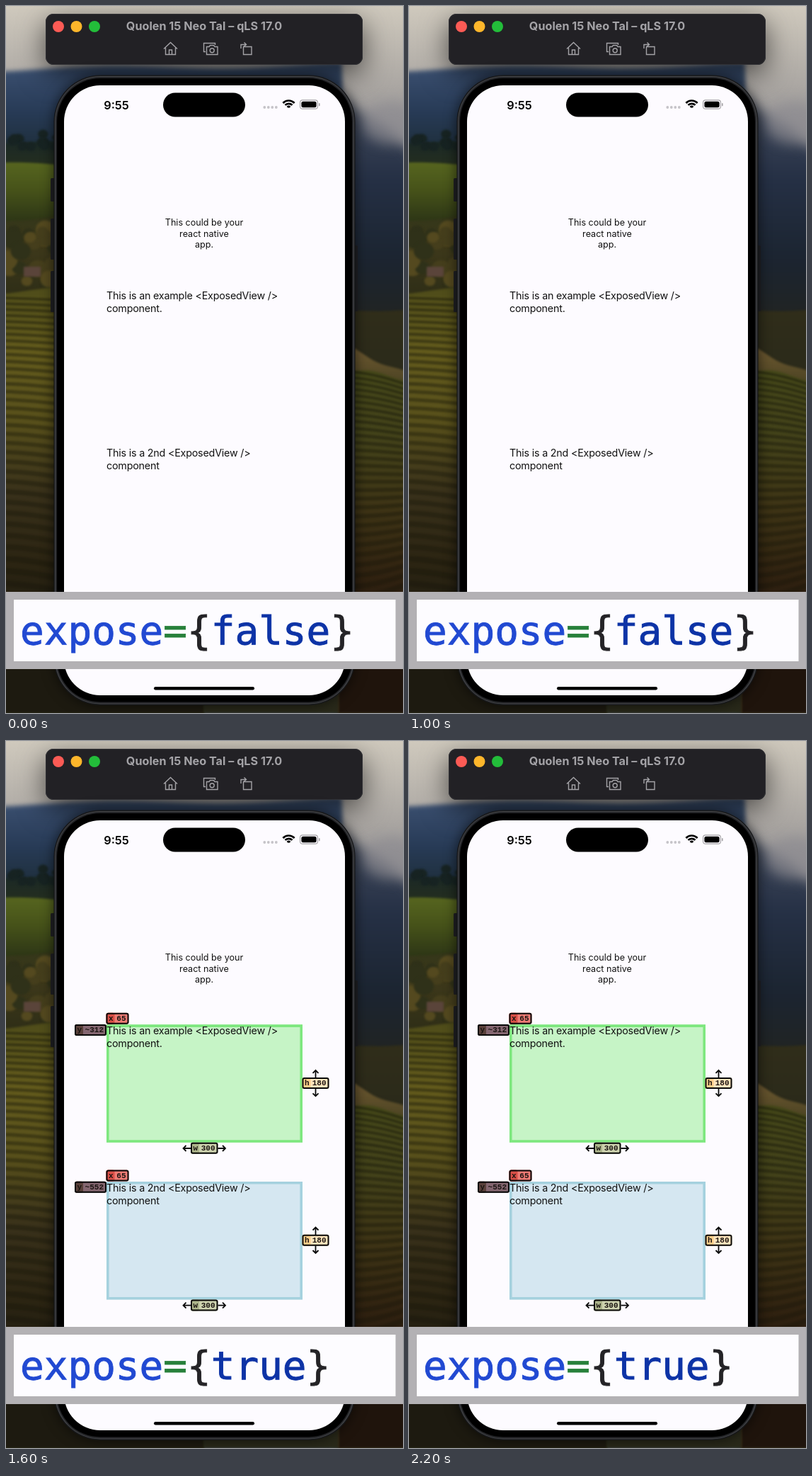
Recreate the animation shown at these times as an HTML page with a canvas. Size 561 by 998 pixels, loop 2.4 s.

```html
<!DOCTYPE html>
<html lang="en">
<head>
<meta charset="utf-8">
<title>Expose demo</title>
<style>
html, body { margin: 0; width: 100%; height: 100%; overflow: hidden; background: #1c1a12; }
canvas { display: block; width: 561px; height: 998px; }
</style>
</head>
<body>
<canvas id="stage" width="561" height="998"></canvas>
<script>
const W = 561, H = 998, MID = 280, LOOP = 2400, SWITCH = LOOP / 2;
const ctx = document.getElementById('stage').getContext('2d');
const SANS = 'Inter, "Liberation Sans", sans-serif';
const MONO = '"Liberation Mono", monospace';
const CODE = '"DejaVu Sans Mono", monospace';
const INK = '#080808', ICON = '#a4a3a7';

function seeded(seed) {
  return () => (seed = seed * 16807 % 2147483647) / 2147483647;
}

function grad(y0, y1, colors) {
  const g = ctx.createLinearGradient(0, y0, 0, y1);
  colors.forEach((c, i) => g.addColorStop(colors.length > 1 ? i / (colors.length - 1) : 0, c));
  return g;
}

function box(x, y, w, h, r, fill) {
  ctx.beginPath();
  ctx.roundRect(x, y, w, h, r);
  ctx.fillStyle = fill;
  ctx.fill();
}

// Stroke lying wholly inside the given box
function frameBox(x, y, w, h, r, color, line) {
  ctx.beginPath();
  ctx.roundRect(x + line / 2, y + line / 2, w - line, h - line, Math.max(0, r - line / 2));
  ctx.strokeStyle = color;
  ctx.lineWidth = line;
  ctx.stroke();
}

function blob(x, y, rx, ry, fill) {
  ctx.beginPath();
  ctx.ellipse(x, y, rx, ry, 0, 0, Math.PI * 2);
  ctx.fillStyle = fill;
  ctx.fill();
}

const dot = (x, y, r, fill) => blob(x, y, r, r, fill);

function path(d, color, line) {
  ctx.strokeStyle = color;
  ctx.lineWidth = line;
  ctx.stroke(new Path2D(d));
}

function text(s, x, y, font, color, align = 'left', track = 0) {
  ctx.font = font;
  ctx.fillStyle = color;
  ctx.textAlign = align;
  ctx.letterSpacing = track + 'px';
  ctx.fillText(s, x, y);
}

// Ground from a ridge line (height y0 to y1) down to the bottom
function ridge(x0, x1, y0, y1, depth, ...colors) {
  ctx.beginPath();
  ctx.moveTo(x0, H);
  for (let u = 0; u <= 1; u += .05)
    ctx.lineTo(x0 + (x1 - x0) * u, y0 + (y1 - y0) * u + 3 * Math.sin(u * 9 + y0));
  ctx.lineTo(x1, H);
  ctx.fillStyle = grad(Math.min(y0, y1), Math.min(y0, y1) + depth, colors);
  ctx.fill();
}

// Vineyard rows, growing wider toward the viewer
function rows(x, top, slope) {
  for (let y = top, step = 8; y < 840; y += step, step *= 1.025) {
    const near = (y - top) / (840 - top), end = y + slope(near);
    path(`M${x} ${y} Q${x + 40} ${y + 1} ${x + 95} ${end}`, `rgba(20,20,8,${.42 - .15 * near})`, step * .45);
  }
}

function scatter(count, seed, y0, y1, size, colors) {
  const rnd = seeded(seed);
  for (let i = 0; i < count; i++) {
    const r = size * (.6 + rnd() * .6);
    blob(rnd() * 75, y0 + (y1 - y0) * rnd(), r, r * .9, colors[i % colors.length]);
  }
}

function landscape() {
  ctx.save();
  ctx.fillStyle = grad(0, 230, ['#cfc9bd', '#aaa6a2', '#85858b']);
  ctx.fillRect(0, 0, W, H);

  ctx.filter = 'blur(3px)';
  ridge(-10, 500, 90, 82, 140, '#3c5172', '#273a55', '#1b2a31');
  ctx.filter = 'blur(9px)';
  ridge(470, 590, 125, 215, 350, '#474f60', '#253045', '#1b2430', '#23231d');
  blob(545, 165, 42, 30, 'rgba(140,138,144,.7)');

  ctx.filter = 'blur(1.5px)';
  ridge(-10, MID, 190, 200, 50, '#1b2826', '#27301c');
  scatter(14, 7, 180, 200, 7, ['#172322']);
  ridge(-10, MID, 224, 220, 80, '#56651f', '#465219', '#2f3816');
  ridge(-10, MID, 302, 280, 120, '#303519', '#3d381a', '#302f17');
  scatter(22, 41, 305, 390, 13, ['#54491f', '#2f3119', '#453e1c']);
  box(25, 368, 24, 14, 1, '#5a443a');
  ridge(-10, MID, 404, 388, 500, '#4c4a19', '#625a1c', '#574f1b', '#38301a', '#2b2412', '#1d1a10');
  ridge(MID, 590, 440, 425, 110, '#302d1a', '#29291a');
  ridge(470, 590, 475, 530, 60, '#715b32', '#4a4222');
  ridge(470, 590, 510, 530, 400, '#444719', '#43421a', '#3d3315', '#2f2110', '#1f140c');

  ctx.filter = 'blur(.8px)';
  rows(-5, 412, near => 4 + 12 * near);
  rows(480, 516, near => 22 - 45 * near);
  ctx.restore();
}

function shadowed(blur, drop, draw) {
  ctx.save();
  ctx.shadowColor = 'rgba(0,0,0,.6)';
  ctx.shadowBlur = blur;
  ctx.shadowOffsetY = drop;
  draw();
  ctx.restore();
}

function toolbar() {
  shadowed(38, 12, () => box(56, 11, 448, 72, 11, '#222125'));
  frameBox(56, 11, 448, 72, 11, '#303034', 1);
  ['#fc5b55', '#fdb62b', '#23bd3a'].forEach((c, i) => dot(74 + i * 25.5, 29, 8, c));
  text('Quolen 15 Neo Tal – qLS 17.0', MID, 34.3, '700 16.2px ' + SANS, ICON, 'center');
  path('M223 60.5 l9.5 -9 l9.5 9 M225.5 59 v9.5 h14 v-9.5 M230.5 68 v-6 h4 v6', ICON, 1.4);
  path('M282 64.5 h-2.5 v-12 h16 v2.5 M283.5 57.5 h3.5 l1.5 -2 h5 l1.5 2 h4 v11 h-15.5 z', ICON, 1.4);
  frameBox(287.5, 59, 7.4, 7.4, 4, ICON, 1.4);
  path('M335.5 57.5 h11.5 v11 h-11.5 z M332 60 v-5.5 h7 m-2.5 -3 l3 3 l-3 2.5', ICON, 1.4);
}

function phone() {
  for (const [x, y, h] of [[63, 243, 33], [63, 300, 58], [63, 374, 58], [491, 338, 93]])
    box(x, y, 6, h, 1.5, '#202124');
  shadowed(18, 0, () => box(67.5, 97.5, 426, 889.5, 66, '#17181a'));
  box(69, 99, 423, 886.5, 64.5, '#48494c');
  box(70, 100, 421, 884.5, 63.5, '#242528');
  box(72, 102, 417, 880.5, 61, '#000');
  box(82, 112, 397, 861, 51, '#fdfbff');
  box(222, 122.5, 116, 34, 17, '#000');
  box(209, 961, 142, 4.5, 2.2, '#000');
}

function statusBar() {
  text('9:55', 156, 145.5, '600 16.3px ' + SANS, '#000', 'center');
  for (let i = 0; i < 4; i++) dot(365.3 + i * 5.5, 143, 1.9, '#c6c4c9');
  ctx.strokeStyle = '#000';
  ctx.lineWidth = 2.7;
  for (let r = 11.3; r > 0; r -= 4.3) {
    ctx.beginPath();
    ctx.arc(399.5, 144.8, r, -Math.PI * .755, -Math.PI * .245);
    ctx.stroke();
  }
  frameBox(415, 132.3, 26, 13.4, 4, '#a3a1a5', 1.1);
  box(417.4, 134.7, 21.2, 8.6, 2.5, '#000');
  box(442, 137, 1.6, 4.4, 1, '#a3a1a5');
}

function tag(x, y, w, key, val, keyFill, valFill) {
  box(x, y, w, 16, 3, valFill);
  box(x, y, 12, 16, 3, keyFill);
  frameBox(x, y, w, 16, 3, INK, 2);
  const font = 'bold 11px ' + MONO;
  text(key, x + 3.5, y + 11.2, font, '#1a1411');
  text(val, x + w - 4, y + 11.2, font, '#1a1411', 'right');
}

function arrow(x, y, angle) {
  ctx.save();
  ctx.translate(x, y);
  ctx.rotate(angle);
  path('M0 0 h10.5 m-4 -4 l4 4 l-4 4', INK, 1.8);
  ctx.restore();
}

function overlay(y, top, fill, border) {
  box(142, y, 277, 166.5, 0, fill);
  frameBox(142, y, 277, 166.5, 0, border, 3.6);
  tag(141.5, y - 16.5, 32, 'x', '65', '#d94f47', '#ee7b74');
  tag(97, y - .3, 45, 'y', top, '#59403a', '#846670');
  tag(418.5, y + 74.7, 38, 'h', '180', '#fdcf8b', '#ffe5bd');
  tag(261, y + 166.5, 38.5, 'w', '300', '#adb58b', '#cdd2ae');
  arrow(261, y + 174.7, Math.PI);
  arrow(299.5, y + 174.7, 0);
  arrow(437.5, y + 75, -Math.PI / 2);
  arrow(437.5, y + 90.5, Math.PI / 2);
}

function lines(list, x, y, lead, size, align, track) {
  list.forEach((s, i) => text(s, x, y + i * lead, `${size}px ${SANS}`, '#111', align, track));
}

function appText() {
  lines(['This could be your', 'react native', 'app.'], MID, 309.7, 15.8, 12.6, 'center');
  lines(['This is an example <ExposedView />', 'component.'], 142, 414.2, 17.6, 14.3, 'left', -.2);
  lines(['This is a 2nd <ExposedView />', 'component'], 142, 636.2, 17.6, 14.3, 'left', -.2);
}

function codeBar(value) {
  box(0, 827, W, 109, 0, '#b3b1b4');
  box(11, 838, 539.5, 87, 0, '#fdfcff');
  ctx.save();
  ctx.filter = 'blur(.7px)';
  ctx.lineWidth = .9;
  let x = 20;
  const parts = [['expose', '#2149d2'], ['=', '#27803a'], ['{', '#242326'], [value, '#0d33a6'], ['}', '#242326']];
  for (const [s, color] of parts) {
    text(s, x, 901, '56px ' + CODE, color);
    ctx.strokeStyle = color;
    ctx.strokeText(s, x, 901);
    x += ctx.measureText(s).width;
  }
  ctx.restore();
}

function scene(on) {
  landscape();
  toolbar();
  phone();
  statusBar();
  if (on) {
    overlay(400.3, '~312', '#c6f4c6', '#7ee77f');
    overlay(622, '~552', '#d5e7f1', '#a5d1de');
  }
  appText();
  codeBar(String(on));
}

let shown = null;
const start = performance.now();
function frame(now) {
  const on = Math.max(0, now - start) % LOOP >= SWITCH;
  if (on !== shown) {
    scene(on);
    shown = on;
  }
  requestAnimationFrame(frame);
}
frame(start);
</script>
</body>
</html>
```
